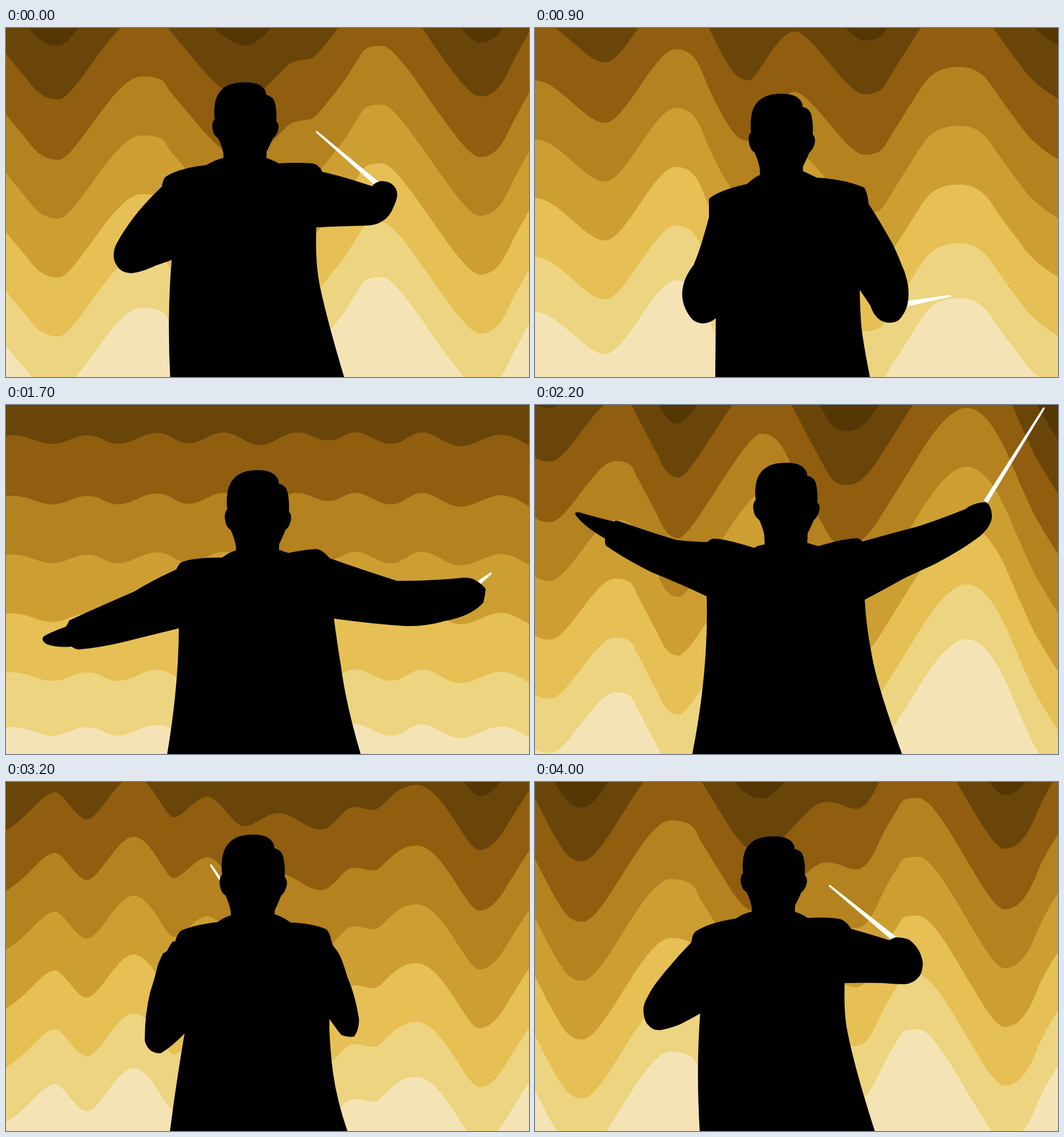
An HTML page without scripts that plays this animation: 917x611 px, repeating every 4.1 s.

```html
<!DOCTYPE html>
<html lang="en">
<head>
<meta charset="utf-8">
<title>Conductor</title>
<style>
html, body { margin: 0; height: 100%; overflow: hidden; background: #553605; }
svg { display: block; width: 100vw; height: 100vh; }

.pose { animation: pose 4.1s -4ms infinite; }
.head { animation: nod 4.1s -4ms infinite; }

/* Each part lists its seven key poses; motion ticks every 100 ms. */
@keyframes pose {
  0%      { d: var(--p0); animation-timing-function: steps(9); }
  21.951% { d: var(--p1); animation-timing-function: steps(8); }
  41.463% { d: var(--p2); animation-timing-function: steps(5); }
  53.658% { d: var(--p3); animation-timing-function: steps(6); }
  68.292% { d: var(--p4); animation-timing-function: steps(8); }
  87.804% { d: var(--p5); animation-timing-function: steps(4); }
  97.561%, 100% { d: var(--p6); animation-timing-function: steps(1); }
}
@keyframes nod {
  0%      { transform: translate(420px, 95px) scale(1, 1); animation-timing-function: steps(9); }
  21.951% { transform: translate(433px, 115px) scale(1, 1.05); animation-timing-function: steps(8); }
  41.463% { transform: translate(442px, 114px) scale(1, 1.07); animation-timing-function: steps(5); }
  53.658% { transform: translate(441px, 101px) scale(1, 1.02); animation-timing-function: steps(6); }
  68.292% { transform: translate(445px, 101px) scale(1, 1.09); animation-timing-function: steps(8); }
  87.804% { transform: translate(422.5px, 83px) scale(1.03, 1.09); animation-timing-function: steps(4); }
  97.561%, 100% { transform: translate(419px, 95px) scale(1, 1); animation-timing-function: steps(1); }
}

.wave {
  --p0: path("M-10,138C0,150 7,161 15,170S32,190 40,200S62,231 92,231C122,231 190,85 237,85S276,98 290,114S340,174 355,190S398,231 421,231S488,172 500,167S523,162 533,160S562,132 582,107S604,74 615,58S625,31 659,31C695,31 795,226 831,226S880,181 890,163S920,107 930,90V900H-60z");
  --p1: path("M-90,104C-80,100 -70,98 -60,96S-42,92 0,92S87,166 123,166C158,166 210,37 247,37S291,75 305,106S331,158 340,172S360,198 375,198S425,112 455,112S546,222 577,222S612,208 620,195S658,134 676,106S712,68 745,68C778,68 794,91 803,105S845,163 860,183S915,232 935,238V900H-60z");
  --p2: path("M-10,162C28,150 54,174 80,174S119,159 143,159S174,174 197,174C220,174 240,155 265,155S297,173 320,173S358,154 382,154S421,176 445,176S486,154 510,154S543,168 565,168S592,154 613,154S652,174 675,174S708,154 730,154C752,154 772,178 797,178S842,158 868,158S912,178 935,185V900H-60z");
  --p3: path("M-10,183C-6,189 -3,205 27,205S106,98 140,98S172,114 180,128C188,142 204,174 212,188S228,233 252,233S367,50 397,50S438,82 450,106S490,183 505,210S525,246 549,246S594,214 603,200S645,133 662,106S720,5 757,5C794,5 823,72 837,106S870,182 880,200S925,275 935,288V900H-60z");
  --p4: path("M-10,241C-2,228 18,190 28,165S68,79 88,79S137,164 152,164C167,164 190,110 210,110S263,198 283,198S338,101 365,101S413,175 430,175S451,174 458,178S495,221 518,221S568,153 592,153S637,178 657,178S708,124 738,124C768,124 812,227 836,227S872,196 880,183S922,122 935,108V900H-60z");
  --p5: path("M-10,149C5,156 25,162 42,162S74,166 85,169S110,179 132,179C160,179 200,82 238,82S290,125 300,137S330,157 345,163S385,192 405,192S465,143 505,143S563,158 585,158S610,154 620,148S632,137 640,130S658,98 700,98C765,98 800,223 824,223S870,192 880,176S920,103 935,82V900H-60z");
  --p6: path("M-10,115C0,135 13,160 20,174S38,207 45,218S62,245 83,245C122,245 190,67 238,67S283,94 292,106S337,180 350,198S375,229 400,229S478,141 508,141S546,153 563,153S592,130 603,106S625,64 635,48S642,28 672,28C712,28 791,223 823,223S872,180 880,160S915,88 935,70V900H-60z");
}
.torso {
  --p0: path("M288,615Q282,500 291,400L273,280Q274,268 279,261Q300,246 351,240Q368,230 383,227L455,227Q470,232 478,237Q510,235 537,237Q548,238 555,252L544,348Q542,410 550,450Q563,512 594,615z");
  --p1: path("M316,615Q317,500 318,420L305,331Q305,315 305,299Q322,284 372,273Q385,260 398,256L471,251Q484,257 494,262Q540,264 577,279Q583,288 585,308L569,420Q569,480 572,520Q575,550 588,615z");
  --p2: path("M282,615Q303,490 303,390L298,289Q302,280 306,276Q325,267 379,267Q392,257 406,254L481,254Q488,257 495,259Q525,253 545,252Q556,254 568,269L575,374Q581,420 587,455Q596,525 623,615z");
  --p3: path("M275,615Q305,465 301,334L300,242Q305,236 312,234Q330,233 384,250Q390,246 403,244L476,241Q488,245 498,247Q535,235 565,233Q572,235 575,240L578,340Q581,390 590,435Q599,490 645,615z");
  --p4: path("M298,615Q308,510 325,398L321,263Q326,255 338,251Q350,249 393,249Q400,244 413,239L484,239Q503,245 517,255Q550,254 575,261Q580,262 584,264L578,388Q586,435 592,480Q600,550 618,615z");
  --p5: path("M276,615Q288,545 303,472L272,297Q272,280 275,270Q305,252 350,241Q362,230 387,224L461,225Q474,230 481,237Q525,240 549,255Q552,262 553,278L556,478Q551,510 555,540Q561,570 582,615z");
  --p6: path("M289,615Q282,500 290,400L274,281Q276,266 281,262Q305,246 352,239Q365,230 380,227L455,227Q470,232 478,238Q515,236 535,240Q546,243 555,258L543,350Q541,405 548,438Q560,500 597,615z");
}
.left {
  --p0: path("M273,278Q256,294 240,312Q223,331 208,354Q201,364 196,374Q190,383 189,394Q188,404 192,412Q197,422 205,426Q213,430 222,429Q240,427 262,416Q277,411 291,406L340,330z");
  --p1: path("M305,331Q301,347 296,363Q289,389 278,415Q270,425 264,438Q259,450 258,464Q258,480 264,492Q270,505 278,512Q287,518 297,517Q308,516 317,508Q325,500 331,488L350,400z");
  --p2: path("M298,288Q255,308 224,327Q170,350 111,377Q108,384 105,388Q78,398 66,405Q60,412 72,419Q90,425 115,423Q120,427 127,428Q165,425 210,414Q250,404 303,391L340,330z");
  --p3: path("M303,240Q265,239 247,236Q200,222 146,203Q140,201 139,204Q112,198 78,188Q66,186 73,195Q88,214 123,234Q122,240 124,246Q160,271 205,293Q250,311 301,335L340,290z");
  --p4: path("M322,262Q327,235 331,208Q328,202 334,190Q334,175 335,158Q330,152 331,132Q327,123 321,130Q313,150 291,194Q258,266 243,352Q242,396 275,404Q295,409 325,399L350,330z");
  --p5: path("M272,297Q263,323 252,352Q242,378 231,401Q221,425 217,440Q212,464 210,490Q209,505 209,520Q210,533 215,540Q227,554 244,556Q258,555 267,546Q284,520 303,480L340,400z");
  --p6: path("M274,281Q260,295 247,310Q228,331 210,355Q203,365 198,375Q190,388 190,400Q191,417 197,424Q202,430 208,433Q215,435 222,434Q238,431 255,424Q273,415 290,405L340,330z");
}
.right {
  --p0: path("M555,252Q588,259 642,277Q647,270 657,268Q668,268 675,272Q685,279 686,290Q686,300 680,312Q673,331 660,338Q648,346 630,346Q590,347 544,349L500,300z");
  --p1: path("M585,308Q606,340 628,380Q637,399 643,415Q648,425 651,437Q655,451 655,465Q655,490 643,505Q637,516 622,516Q598,516 588,486Q578,471 569,458L520,360z");
  --p2: path("M567,268Q620,287 686,308Q740,308 795,303Q806,301 818,304Q835,313 841,322Q840,334 837,346Q815,370 770,378Q735,388 700,387Q640,383 575,374L520,320z");
  --p3: path("M574,239Q620,226 670,213Q705,202 755,182Q768,171 790,170Q800,175 801,193Q802,210 781,229Q745,256 700,279Q676,290 650,302Q614,322 578,341L520,290z");
  --p4: path("M583,263Q581,240 577,226Q573,216 582,218Q602,228 611,234Q623,248 635,265Q663,304 681,366Q683,390 667,401Q655,408 635,405Q606,403 578,388L520,330z");
  --p5: path("M553,277Q558,294 560,310Q564,332 565,355Q566,370 565,385Q565,403 563,420Q561,440 557,465Q555,478 554,490Q548,488 540,480Q535,440 530,400L500,330z");
  --p6: path("M554,257Q590,267 621,277Q626,274 632,272Q646,272 656,276Q676,291 680,316Q680,331 674,340Q664,353 648,354Q630,354 610,352Q575,351 543,352L500,300z");
}
.baton {
  --p0: path("M545,182L653,271L649,275z");
  --p1: path("M728,469L650,480L650,486z");
  --p2: path("M850,295L829,309L831,312z");
  --p3: path("M892,6L793,169L789,167z");
  --p4: path("M537,96L595,226L591,228z");
  --p5: path("M182,196L277,286L272,291z");
  --p6: path("M517,182L632,272L627,276z");
}
</style>
</head>
<body>
<svg viewBox="0 0 917 611" preserveAspectRatio="none">
  <path class="pose wave" fill="#694509" transform="translate(0 -200)"/>
  <path class="pose wave" fill="#905e0e" transform="translate(0 -106)"/>
  <path class="pose wave" fill="#b4821e"/>
  <path class="pose wave" fill="#cd9f33" transform="translate(0 103)"/>
  <path class="pose wave" fill="#e6c055" transform="translate(0 206)"/>
  <path class="pose wave" fill="#edd480" transform="translate(0 309)"/>
  <path class="pose wave" fill="#f4e4b5" transform="translate(0 405)"/>
  <path class="pose baton" fill="#fff" stroke="#fff" stroke-width="3.4" stroke-linejoin="round"/>
  <path class="pose left"/>
  <path class="pose right"/>
  <path class="pose torso"/>
  <path class="head" d="M-38,146L-39,124Q-42,110 -48,98Q-56,94 -58,81Q-60,70 -54,64Q-56,52 -54,40Q-52,18 -34,7Q-22,0 0,0Q30,0 36,18V22Q50,25 52,38Q55,50 54,68Q60,74 57,84Q54,94 48,98Q42,112 37,121L36,146z"/>
</svg>
</body>
</html>
```
